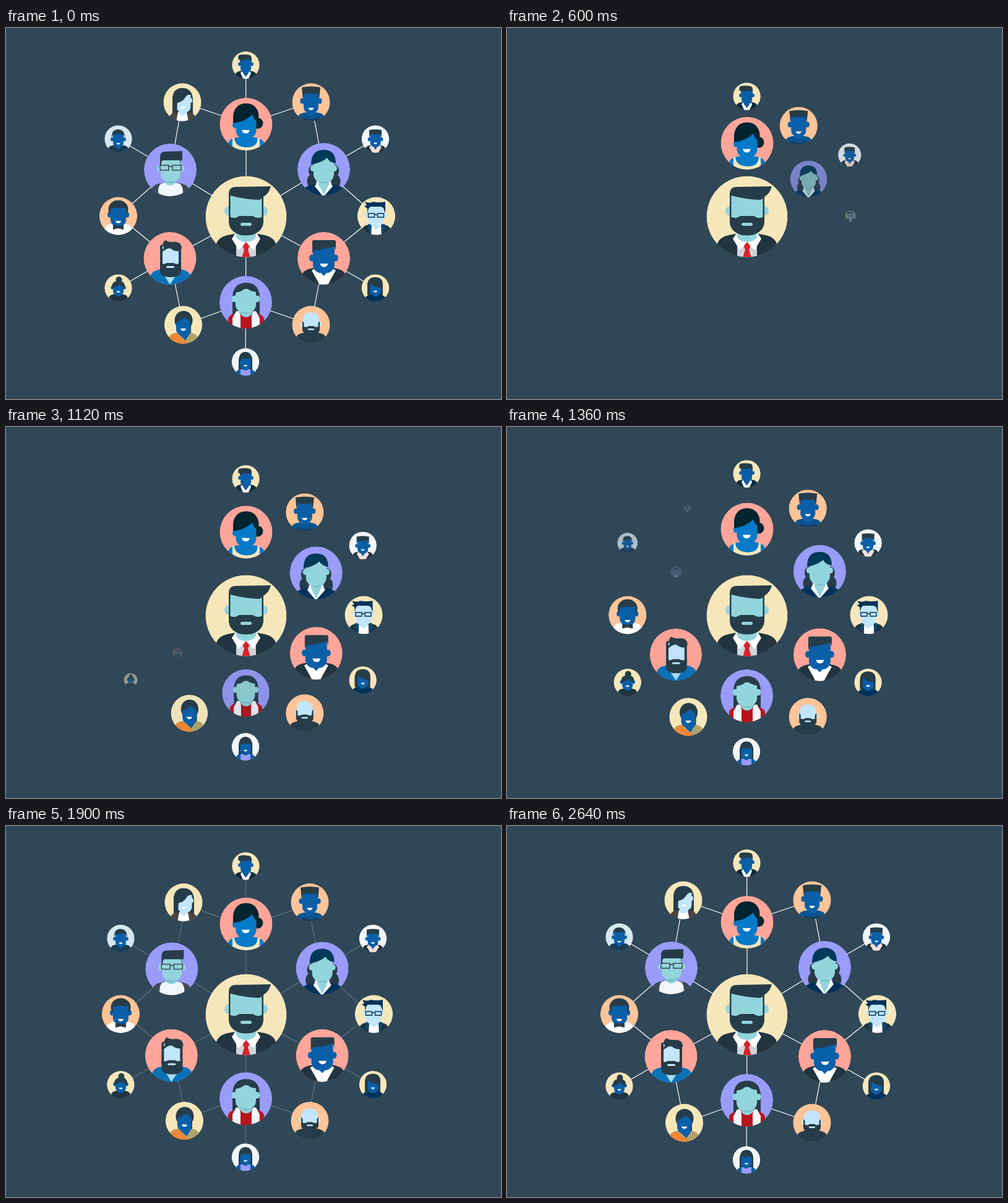
An HTML page that plays this animation: 800x600 px, repeating every 5.02 s.

```html
<!DOCTYPE html>
<html>
<head>
<meta charset="utf-8">
<style>
html, body { margin: 0; width: 100%; height: 100%; overflow: hidden; background: #304757 }
svg { display: block }
</style>
</head>
<body>
<svg id="stage" width="800" height="600" viewBox="0 0 800 600"></svg>
<script>
const CREAM = '#f6e7bb', PINK = '#ffa599', LILAC = '#999cf9', ORANGE = '#ffc498', WHITE = '#f0f6f9', PALE = '#d6e7f0';
const DARK = '#263d49', SUIT = '#21343f', NAVY = '#00325a', TEAL = '#93d5dc', SHADE = '#79bfc9';
const LIGHT = '#c2e6fd', BLUE = '#0a5fa9', SKY = '#047ac9', RED = '#b8141d';

const path = (c, d) => `<path fill="${c}" d="${d}"/>`;
const oval = (c, x, y, rx, ry = rx) => `<ellipse fill="${c}" cx="${x}" cy="${y}" rx="${rx}" ry="${ry}"/>`;
const box = (c, x, y, w, h, r = 0) => `<rect fill="${c}" x="${x}" y="${y}" width="${w}" height="${h}" rx="${r}"/>`;
const ears = (c, x, y, w, r) => oval(c, x - w, y, r * .8, r) + oval(c, x + w, y, r * .8, r);
const face = (c, x, top, end, w) => path(c,
  `M${x - w} ${top}H${x + w}V${end - w * .7}Q${x + w * .95} ${end - w * .2} ${x + w * .45} ${end}H${x - w * .45}Q${x - w * .95} ${end - w * .2} ${x - w} ${end - w * .7}Z`);
const smile = (x, y, w) => path('#fff', `M${x - w} ${y}H${x + w}Q${x + w * .8} ${y + w * .85} ${x} ${y + w * .85}T${x - w} ${y}Z`);
const body = (c, x, y, w) => path(c,
  `M${x - w} ${y + 40}V${y + w * .36}Q${x - w * .95} ${y + w * .14} ${x - w * .62} ${y + w * .06}L${x - w * .3} ${y}H${x + w * .3}L${x + w * .62} ${y + w * .06}Q${x + w * .95} ${y + w * .14} ${x + w} ${y + w * .36}V${y + 40}Z`);
const vee = (c, x, y, w, h) => path(c, `M${x - w} ${y}H${x + w}L${x} ${y + h}Z`);
const glasses = (c, x, y, w, h, gap, sw) =>
  `<path fill="none" stroke="${c}" stroke-width="${sw}" d="M${x - gap - w} ${y}h${w}v${h}h${-w}zM${x + gap} ${y}h${w}v${h}h${-w}zM${x - gap} ${y + 2}h${gap * 2}"/>`;

const boss = body(SUIT, 388, 332, 48) + box('#cdd4da', 372, 338, 32, 34)
  + path('#fff', 'M372 330L365 341L376 359L388 347L400 359L411 341L404 330Z')
  + path(TEAL, 'M372 322H404V338Q399 346 388 346T372 338Z')
  + path('#d9222a', 'M388 346L393.5 353L391 358L395 372H381L385 358L382.5 353Z')
  + ears(TEAL, 388, 296, 29, 7.5) + box(TEAL, 361, 262, 54, 60)
  + path(DARK, 'M360 310V269Q360 257 371 257L428 256Q425 268 416 273V310H413.500V276L409 278Q385 277 362.500 271V310Z')
  + path(DARK, 'M360 303L363 306Q371 309 377 304Q388 304 399 304Q405 309 413 306L416 303V315Q415 326 404 332Q398 335.500 388 335.500T372 332Q361 326 360 315Z')
  + box(TEAL, 379, 315, 18, 5, 2.5);

const big = [
  // bun and tank top
  oval('#02242f', 388, 142, 20.500, 20) + oval('#02242f', 406.5, 154, 9)
  + body(SKY, 388, 176, 29) + path(CREAM, 'M366 178L369 178Q370 192 388 193T407 178L410 178V200H366Z')
  + box('#0468ae', 379, 170, 18, 10) + path(SKY, 'M379 177H397V185Q388 191 379 185Z')
  + oval(SKY, 369.500, 157, 3.500, 5) + face(SKY, 388, 140, 178, 16.5)
  + path('#02242f', 'M367 154V142Q370 122 388 122T408 142V153Q401 149 398 140Q386 152 367 154Z') + smile(387.5, 165, 6.5),

  // long waves, navy blazer
  [496, 531].map(x => oval(DARK, x, 231, 7, 10)).join('') + [494, 533].map(x => oval(DARK, x, 248, 7.5, 11)).join('')
  + body(NAVY, 513.5, 252, 34) + path('#fff', 'M505 246L499 256L513 273L528 256L522 246Z')
  + path(TEAL, 'M505 242H522V253L513.500 270L505 253Z') + path(SHADE, 'M505 246Q513 252 522 246V250Q513 254 505 249Z')
  + ears(TEAL, 513.5, 227, 17.5, 5) + face(TEAL, 513.5, 208, 249, 16.5)
  + path('#003a59', 'M493 221Q493 197 513 197T533 219Q522 217 519 210Q508 219 493 221Z'),

  // flat top, open collar
  body(SUIT, 513.5, 387, 35.5) + path('#fff', 'M503 387L494 392L503 408L507 416H520L524 408L533 392L524 387Z')
  + path(BLUE, 'M504 384H523V391L513.500 401L504 391Z') + ears(BLUE, 513.5, 372, 19, 5.5)
  + face(BLUE, 513.5, 350, 396, 17.5)
  + path(DARK, 'M495 364V346Q495 343 498 343H530Q533 343 533 346V360L531 353Q516 358 497 360Z') + smile(514, 381, 6.5),

  // straight long hair, red top
  path(DARK, 'M366 478V434Q368 412 388 412T410 434V478Z') + body(RED, 388, 460, 29)
  + path(WHITE, 'M372 458L366 469V488H381V474L377 458ZM399 458L395 474V488H410V469L404 458Z')
  + path(RED, 'M379 464L388 470L397 464V488H379Z') + path(TEAL, 'M378 454H398V462Q388 473 378 462Z')
  + path(SHADE, 'M378 459H398V461Q388 465 378 461Z') + ears(TEAL, 387.5, 438, 18.5, 5.5) + face(TEAL, 387.5, 422, 460, 16.5)
  + path(DARK, 'M368 434Q368 413 388 413T407 434L404 427Q392 426 388 418Q384 426 371 428Z'),

  // long beard, blue shirt
  body('#0b72ba', 266, 389, 32) + path('#a4daf2', 'M252 394L265 415L279 394Z') + path(LIGHT, 'M257 391H274L265 408Z')
  + box(DARK, 249, 350, 34, 40, 4) + box(LIGHT, 253, 352, 26, 32)
  + path(DARK, 'M249 362L255 356Q251 347 258 343Q261 346 268 346Q282 344 284 354Q284 361 279 361Q271 361 267 357Q262 354 253 362Z')
  + path(DARK, 'M249 379Q254 384 260 380H271Q277 384 283 379V395Q280 403 266 403T249 395Z') + box(LIGHT, 259, 385, 13, 3, 1.5),

  // quiff and glasses
  body('#3e4a55', 265.5, 250, 30) + path(WHITE, 'M250 252Q245 256 246 273H286Q287 256 281 252L274 250H257Z')
  + path(TEAL, 'M256 242H275V250Q265 259 256 250Z') + path(SHADE, 'M256 246H275V249Q265 253 256 249Z')
  + ears(TEAL, 266, 227, 18, 5) + face(TEAL, 266, 208, 248, 16)
  + path(DARK, 'M249 223V207Q250 200 257 200L285 199V213L282 215V222L281 214H253L251 217V223Z')
  + glasses('#3a4650', 266, 222, 14, 8, 3, 1.5)
];

const medium = [
  body('#0a548f', 493, 136, 21) + path('#1d3c58', 'M471 147Q480 147 484 145Q493 151 502 145Q508 147 515 147V155H471Z')
  + box(BLUE, 486, 130, 14, 11) + ears(BLUE, 493, 118, 14, 4.5) + face(BLUE, 493, 104, 137, 12)
  + path(DARK, 'M478 96Q493 93 508 96L506 116L504 106H482L480 116Z') + smile(493, 129, 4.5),

  body(SUIT, 598.5, 317, 23) + path('#fff', 'M591 318L590 336H607L606 318L598 325Z') + path(LIGHT, 'M592 315H605V321L598 326L592 321Z')
  + path('#00507a', 'M585 317H590V327L586 331ZM607 317H612L611 331L607 327Z')
  + ears(LIGHT, 598, 302, 14, 4) + face(LIGHT, 598, 286, 320, 12.5)
  + path(NAVY, 'M584 300V292L579 288L583 287L580 281Q588 284 593 281Q602 283 613 281V300L610 291L606 289H589L586 292Z')
  + glasses(NAVY, 598, 300, 10, 6, 2.5, 1.4),

  body(DARK, 493, 492, 24) + ears(LIGHT, 493, 479, 13.5, 4) + path(LIGHT, 'M480 485V473Q480 460 493 460T506 473V485Z')
  + path(DARK, 'M479 474L481.500 477V483Q486 485 489 482H497Q500 485 504.500 483V477L507 474V489Q504 497 493 497T479 489Z')
  + box(LIGHT, 488, 486, 10, 2.5, 1.2),

  path(DARK, 'M292 468H299V492Q300 500 295 499Q291 495 292 490Z') + body('#b3a267', 286.5, 492, 23)
  + path('#ef8737', 'M263 512V500Q268 495 276 494L296 512Z') + path(BLUE, 'M277 493L281 486H292L298 493L290 505Z')
  + oval(DARK, 287, 473, 14.5, 15.5) + face(BLUE, 286.5, 469, 496, 11.5)
  + path(DARK, 'M273 477Q272 458 287 458T301 477Q294 474 290 466Q283 474 273 477Z') + smile(286.5, 486, 4.5),

  body('#fff', 181.5, 316, 22) + box(BLUE, 174, 312, 14, 9) + ears(BLUE, 181.5, 302, 14, 4.5)
  + oval(DARK, 181.5, 293, 16, 14.5) + face(BLUE, 181.5, 291, 320, 12.5)
  + path(DARK, 'M167 300Q165 279 181 279T197 300L194 291Q181 290 169 292Z')
  + path(DARK, 'M173 318L181 320L190 318V326L181 324L173 326Z') + smile(181.5, 312, 4.5),

  path(DARK, 'M269 140V114Q270 97 285 97T302 114V140Z') + body('#4b4541', 285, 136, 21)
  + path('#fff', 'M278 136L275 152H295L292 136Z') + path(LIGHT, 'M279 132H291V138Q285 146 279 138Z')
  + face(LIGHT, 287, 108, 136, 11.5) + oval(LIGHT, 298, 117, 3, 4)
  + path(DARK, 'M269 132V114Q271 98 286 98Q299 99 300 108Q293 107 290 112Q285 120 277 121L276 134Z')
  + smile(285.5, 127, 4)
];

const small = [
  body('#0b2c3c', 387.5, 69, 17) + path('#fff', 'M382 68L379 73L384 84H391L396 73L393 68Z') + path(BLUE, 'M383 68H392V73L387.500 79L383 73Z')
  + ears(BLUE, 387.5, 58.5, 10, 3) + face(BLUE, 387.5, 50, 72, 8.5)
  + path(DARK, 'M378 57V52L375 50L376 44Q382 42 390 43Q397 43 397 49V57L395 51L380 52Z'),

  body(SUIT, 597, 189, 16) + path('#f5dfd8', 'M591 188L587 193L593 203H601L607 193L603 188Z') + vee(BLUE, 597, 189, 5, 8)
  + ears(BLUE, 597, 180, 10, 3) + face(BLUE, 597, 170, 192, 8.5)
  + path(DARK, 'M587 178V165Q597 163 607 165V178L605 172H589Z') + smile(597, 185.500, 3),

  path(DARK, 'M584 432V417Q584 403 597 403T609 417V432Z') + body(NAVY, 597, 431, 16.5) + box(BLUE, 592, 426, 10, 8, 3)
  + face(BLUE, 597, 412, 432, 9) + path(DARK, 'M584 430V417Q584 403 597 403T609 420Q595 421 590 413L587 430Z') + smile(597, 425, 3.2),

  path(DARK, 'M376 558V537Q377 524 387 524T398 537V558Z') + body(BLUE, 387, 551, 15) + path(LILAC, 'M379 552H383Q387 556 391 552H395V564H379Z')
  + box(BLUE, 383, 545, 8, 8, 2) + face(BLUE, 387, 532, 552, 8.5)
  + path(DARK, 'M377 541V536Q378 524 387 524T398 536V541L395 535H380Z') + smile(387, 545, 3),

  oval(DARK, 182.5, 407, 5) + body(SUIT, 181.5, 430, 15) + box(BLUE, 177, 426, 9, 8, 3) + ears(BLUE, 181.5, 420, 10, 2.8)
  + oval(DARK, 181.5, 418, 10.5, 9) + face(BLUE, 181.5, 415, 432, 8.5)
  + path(DARK, 'M171 420Q171 409 182 409T192 420Q185 419 183 414Q178 420 171 420Z') + smile(181.5, 425.5, 3),

  body('#1c3c55', 181.5, 189, 16) + vee(BLUE, 181.5, 189, 5.5, 8) + ears(BLUE, 181.5, 180, 10, 3)
  + face(BLUE, 181.5, 171, 192, 8.5) + path(DARK, 'M171 178Q170 164 181 164T192 178L190 172H173Z') + smile(181.5, 186, 3)
];

// x, y, radius, backdrop, start, duration, art
const ring = (r, dur, art, rows) => rows.map(([x, y, bg, start], i) => [x, y, r, bg, start, dur, art[i]]);
const people = [
  [388, 305, 65.5, CREAM, 250, 240, boss],
  ...ring(42.6, 300, big, [[388, 155.5, PINK, 270], [513.5, 228.5, LILAC, 390], [513.5, 372.5, PINK, 615],
    [387.5, 443.5, LILAC, 850], [265, 372.5, PINK, 1063], [265.5, 229.5, LILAC, 1295]]),
  ...ring(30.7, 190, medium, [[493, 120, ORANGE, 350], [598.5, 304, CREAM, 545], [493, 480, ORANGE, 775],
    [286.5, 480, CREAM, 935], [181.5, 304, ORANGE, 1130], [285, 120, CREAM, 1325]]),
  ...ring(22.3, 200, small, [[387.5, 60, CREAM, 290], [597, 179.5, WHITE, 432], [597, 420.5, CREAM, 625],
    [387, 540, WHITE, 822], [181.5, 420.5, CREAM, 1020], [181.5, 179.5, PALE, 1212]])
];

let links = '';
const link = (a, b) => links += `M${people[a][0]} ${people[a][1]}L${people[b][0]} ${people[b][1]}`;
for (let i = 0; i < 6; i++) {
  link(0, 1 + i);
  link(1 + i, 13 + i);
  link(1 + i, 7 + i);
  link(7 + i, 1 + (i + 1) % 6);
}

const stage = document.getElementById('stage');
stage.innerHTML = `<path id="links" d="${links}" stroke="#fff" stroke-width="1.2" fill="none"/>` + people.map(([x, y, r, bg, , , art], i) =>
  `<clipPath id="c${i}"><circle cx="${x}" cy="${y}" r="${r}"/></clipPath>
   <g class="person"><g clip-path="url(#c${i})">${oval(bg, x, y, r)}${art}</g></g>`).join('');
const lines = document.getElementById('links');
const groups = stage.querySelectorAll('.person');

const CX = 388, CY = 304.5, LOOP = 5020;
const clamp = v => Math.max(0, Math.min(1, v));

function draw(ms) {
  let t = Math.floor(ms % LOOP / 20) * 20;
  stage.style.opacity = t < 100 ? clamp(1 - (t - 20) / 80) : 1;
  if (t < 100) t = LOOP;
  const u = Math.max(0, 2640 - t) / 2000;
  const spread = 1 - u * u * (.13 + .066 * u * u);
  // the links grow at a steady rate, slightly behind the people
  lines.setAttribute('transform', `translate(${CX} ${CY}) scale(${1 - u * .115}) translate(${-CX} ${-CY})`);
  lines.setAttribute('opacity', clamp((t - 1700) / 860));
  people.forEach(([x, y, , , start, dur], i) => {
    const p = clamp((t - start) / dur), k = i ? spread : 1;
    groups[i].setAttribute('transform',
      `translate(${CX + (x - CX) * k} ${CY + (y - CY) * k}) scale(${p}) translate(${-x} ${-y})`);
    groups[i].setAttribute('opacity', p);
  });
}

const begin = performance.now();
function tick() {
  draw(performance.now() - begin);
  requestAnimationFrame(tick);
}
tick();
</script>
</body>
</html>
```
